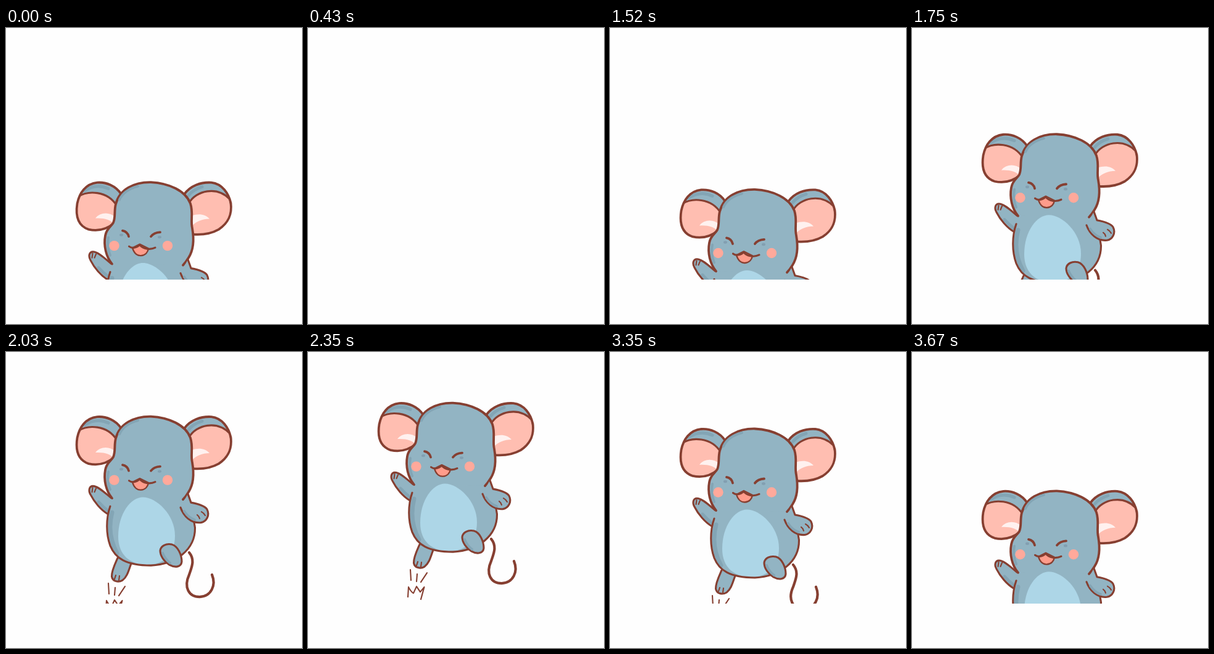
An HTML page that plays this animation: 480x480 px, repeating every 3730 ms.

```html
<!DOCTYPE html>
<html lang="en">
<head>
<meta charset="utf-8">
<title>Mouse hop</title>
<style>
  html, body { margin: 0; width: 100%; height: 100%; overflow: hidden; background: #fefefe; }
  svg { display: block; width: 100vw; height: 100vh; }
  .line { fill: none; }
  .blue { fill: #92b4c3; }
  .pink { fill: #ffbeb1; }
  .shade { fill: none; stroke: #83a5b5; stroke-width: 5; }
  .cheek { fill: #ffa99b; }
  .glint { fill: #fff1ef; stroke: none; }
  .thin { fill: none; stroke-width: 2.1; }
  .bold { stroke-width: 3.8; }
</style>
</head>
<body>
<svg viewBox="0 0 480 480" xmlns="http://www.w3.org/2000/svg">
  <defs>
    <clipPath id="floor"><rect width="480" height="408"/></clipPath>
    <path id="earL" d="M187 103C178 89 162 83 148 84C129 86 119 101 115.500 118C112 141 119 155 134 160C148 163 163 160 175 150L184 125Z"/>
    <path id="earR" d="M289 103C299 89 316 83 333 84C351 86 361 102 364.500 117C367 137 360 150 345 160C331 168 317 169 303 168L296 130Z"/>
    <clipPath id="clipL"><use href="#earL"/></clipPath>
    <clipPath id="clipR"><use href="#earR"/></clipPath>
    <path id="trunk" d="M169 229C162 249 162 274 169 293C177 313 194 325 235 325C276 323 307 299 306.500 264C306 244 300 229 294 210L172 214L167 224Z"/>
    <clipPath id="clipB"><use href="#trunk"/></clipPath>
  </defs>
  <g clip-path="url(#floor)">
    <g id="mouse" stroke="#863f31" stroke-width="3.100" stroke-linecap="round" stroke-linejoin="round">
      <path class="line" stroke-width="4.200" d="M297 304C307 316 301 328 297 340C288 360 296 376 314 376C333 375 341 357 334 340"/>

      <g clip-path="url(#clipL)">
        <use href="#earL" class="blue" stroke="none"/>
        <path class="shade" d="M128 97Q147 85 166 94"/>
        <path class="pink" d="M117 107C132 97 164 96 180 122L180 170H105V115Z"/>
        <path class="glint" d="M145 142C152 132 168 131 177 140L175 151C169 144 158 141 145 142Z"/>
      </g>
      <path class="line bold" d="M187 103C178 89 162 83 148 84C129 86 119 101 115.500 118C112 141 119 155 134 160C148 163 163 160 175 150"/>

      <g clip-path="url(#clipR)">
        <use href="#earR" class="blue" stroke="none"/>
        <path class="shade" d="M296 105Q304 95 318 91"/>
        <path class="pink" d="M297 117C308 97 342 89 363 111L375 175H290Z"/>
        <path class="glint" d="M301 138C312 134 323 135 330 143C318 143 309 147 302 154Z"/>
      </g>
      <path class="line bold" d="M289 103C299 89 316 83 333 84C351 86 361 102 364.500 117C367 137 360 150 345 160C331 168 317 169 303 168"/>

      <path class="blue" d="M181 313C177 322 171 334 171.500 343C173 351 182 353 189 349C197 343 199 332 203 322"/>
      <path class="thin" d="M176 347L178 341M183 349L184 342"/>

      <path class="blue" d="M171 216C160 207 151 198 143 196.500C135 195 133 203 137 210C143 222 154 235 165 241.500"/>
      <path class="shade" stroke-width="3" d="M150 222Q157 230 165 236"/>
      <path class="thin" d="M139.500 206L140.500 199M143.500 206L146 200"/>

      <use href="#trunk" class="blue" stroke="none"/>
      <path class="shade" style="stroke-width:7" clip-path="url(#clipB)" d="M172 239C166 262 168 283 180 305"/>
      <path class="blue bold" d="M172 216C162 204 158 186 161 170C163 158 171 155 174 149C178 140 175 130 178 119C184 95 208 83 235 83.500C264 85 291 97 299 118C304 133 299 145 302 158C305 175 305 192 296 206C293 211 290 215 287 218"/>
      <path class="shade" style="stroke-width:4" d="M184 112Q191 96 214 90M166 173Q163 188 169 202"/>
      <path fill="#add6e7" stroke="none" clip-path="url(#clipB)" d="M222 214.500C243 214.500 274 242 274 277C274 308 255 324 229 324C202 324 182 309 182 278C182 240 203 214.500 222 214.500Z"/>
      <path class="line" d="M169 229C162 249 162 274 169 293C177 313 194 325 235 325C276 323 307 299 306.500 264L305 255"/>

      <path class="blue" d="M295 209L300 223C311 225 322 228 326 234C331 244 325 254 316 255.500C300 257 288 245 283 231"/>
      <path class="shade" style="stroke-width:4" d="M289 237Q296 248 306 251"/>
      <path class="thin" d="M310 243Q313 245 314 249M317 238Q321 240 323 244"/>

      <path class="blue" d="M250 301C251 293 260 289 269 291C279 294 285 308 285 319C284 328 274 329 265 324C257 319 250 310 250 301Z"/>
      <path class="shade" style="stroke-width:4" d="M254 305Q258 315 266 321"/>

      <g stroke="none">
        <circle class="cheek" cx="175.500" cy="186.500" r="8.200"/>
        <circle class="cheek" cx="262" cy="186.500" r="8.200"/>
        <ellipse fill="#829fb1" cx="187" cy="169" rx="3" ry="2.200"/>
        <ellipse fill="#829fb1" cx="249" cy="172.500" rx="3" ry="2.200"/>
      </g>
      <path class="line bold" d="M189 162Q197 163.500 199 171.500M235 171.500Q240 165 250 164.500"/>
      <path fill="#ff9c8b" stroke-width="2.400" d="M205 190C208 200 214 203 219 202.500C226 202 230 197 231 191L217 184Z"/>
      <path class="line" d="M199.500 187.500C204 191 212 190.500 216.500 185C222 191.500 233 194 242 189.500"/>

      <path class="thin" d="M166 354L167 371M177 361L176 373M193 359L183 374M162 398L163 382Q167 390 171 392L176 381L182 390L188.500 382L183 402"/>
    </g>
  </g>
</svg>
<script>
  const LOOP = 3730;
  const HIDDEN = 345;
  const REST = -0.9;
  const mouse = document.getElementById("mouse");

  // Runs of equally spaced poses: first time, spacing, count.
  const runs = [
    [0, 60, 1], [60, 50, 2], [160, 40, 7], [430, 0, 1],
    [1200, 30, 1], [1230, 40, 7], [1520, 50, 1], [1570, 60, 3],
    [1750, 70, 4], [2030, 80, 5],
    [3030, 80, 3], [3270, 70, 4], [3550, 60, 3]
  ];
  const steps = runs.flatMap(([t, gap, n]) => Array.from({ length: n }, (_, i) => t + i * gap));

  const clamp = x => Math.min(1, Math.max(0, x));
  const inOut = x => x < 0.5 ? 2 * x * x : 1 - 2 * (1 - x) ** 2;
  const ease = (t, start) => inOut(clamp((t - start) / 1730));

  function drop(t) {
    if (t < 430) return 412 * ease(t + LOOP, 2950);
    if (t < 1200) return HIDDEN;
    if (t < 2800) return 435.5 * (1 - ease(t, 575));
    return 412 * ease(t, 2950);
  }

  function draw(t) {
    const pose = steps.filter(s => s <= t).pop();
    mouse.setAttribute("transform", `translate(0 ${(drop(pose) + REST).toFixed(2)})`);
  }

  const began = performance.now();
  function tick() {
    draw((performance.now() - began) % LOOP);
    requestAnimationFrame(tick);
  }
  draw(0);
  requestAnimationFrame(tick);
</script>
</body>
</html>
```
